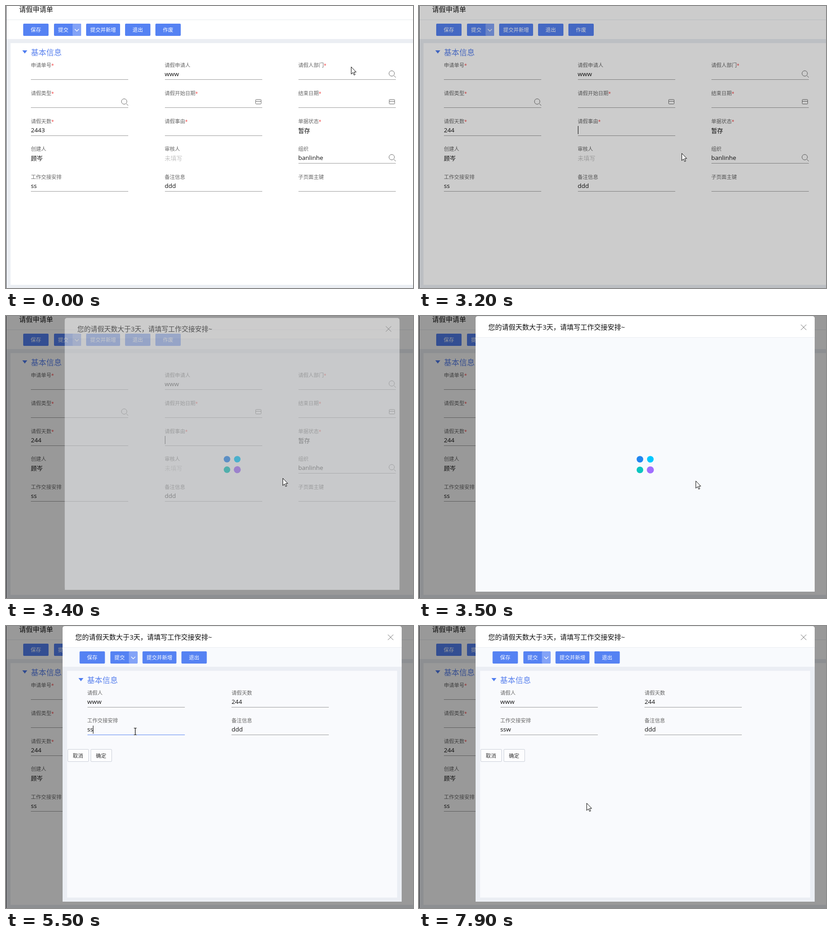
Animation of 899 by 623 pixels, one loop 8000 ms. Source, as an HTML page:

```html
<!DOCTYPE html>
<html lang="zh-CN">
<head>
<meta charset="utf-8">
<title>请假申请单</title>
<style>
  html, body { margin: 0; width: 100%; height: 100%; overflow: hidden; background: #fff; }
  svg { display: block; width: 899px; height: 623px; }
  text { font-family: "Open Sans", "Noto Sans CJK SC", "Noto Sans CJK", sans-serif; fill: #111; white-space: pre; }
  .label { font-size: 11.3px; fill: #666; }
  .star { font-size: 10px; fill: #f23c3c; }
  .latin { font-size: 13.5px; }
  .han { font-size: 13px; }
  .empty { font-size: 13px; fill: #c4c4c4; }
  .heading { font-size: 17px; fill: #5a82ee; }
  .title { font-size: 15px; }
  .button { font-size: 11.4px; fill: #fff; text-anchor: middle; }
  .plain { font-size: 11.4px; fill: #333; text-anchor: middle; }
  .icon { fill: none; stroke: #666; }
  .line { fill: #999; }
  .line.active { fill: #5582f3; }
</style>
</head>
<body>
<svg id="stage" viewBox="0 0 899 623"></svg>
<script>
const PITCH = 61.75;

const rect = (x, y, w, h, fill, extra = '') =>
  `<rect x="${x}" y="${y}" width="${w}" height="${h}" fill="${fill}" ${extra}/>`;
const text = (x, y, kind, content, extra = '') =>
  `<text x="${x}" y="${y}" class="${kind}" ${extra}>${content}</text>`;

const icons = {
  search: (x, y) => `<path class="icon" d="M${x + 4} ${y + 4}l4 4"/>
    <circle class="icon" cx="${x - 1}" cy="${y - 1}" r="6"/>`,
  calendar: (x, y) => `<rect class="icon" x="${x - 6.5}" y="${y - 5.5}" width="12" height="10" rx="1"/>
    <path class="icon" d="M${x - 6} ${y - 1.5}h11"/>`
};

// One form cell: label, value, underline and icon, placed by row.
function field(x, top, row, { label, must, value = '', kind = 'latin', line = true, icon, id = '' }) {
  const y = top + row * PITCH;
  const baseline = Math.round(y + 24 + (kind === 'latin' ? 0 : 1));
  const star = must ? '<tspan class="star">*</tspan>' : '';
  return text(x, Math.round(y + 4), 'label', label + star)
    + text(x, baseline, kind, value, id && `id="${id}Value"`)
    + (line ? rect(Math.round(x), Math.round(y + 31), 215, 1, '', `class="line" id="${id}Line"`) : '')
    + (icon ? icons[icon](Math.round(x + 207), Math.round(y + 19)) : '');
}

function buttons(dx, dy, labels) {
  const spans = [[38, 56], [106, 60], [177, 75], [263, 56], [330, 56]];
  return labels.map((label, i) => {
    const [x, w] = spans[i];
    const split = i === 1;
    return rect(x + dx, 39 + dy, w, 27, '#5582f3', 'rx="2"')
      + (split ? rect(x + dx + 41, 39 + dy, 19, 27, '#83a3f7', 'rx="2"')
        + `<path d="M${x + dx + 46} ${dy + 51}l4.5 4.5 4.5-4.5" fill="none" stroke="#fff" stroke-width="1.3"/>` : '')
      + text(x + dx + (split ? 20.5 : w / 2), 57 + dy, 'button', label);
  }).join('');
}

const heading = (dx, dy) =>
  `<path d="M${36 + dx} ${98 + dy}h11l-5.5 7z" fill="#4f7df0"/>` + text(55 + dx, 109 + dy, 'heading', '基本信息');

const mainFields = [
  [{ label: '申请单号', must: 1 }, { label: '请假申请人', value: 'www' }, { label: '请假人部门', must: 1, icon: 'search' }],
  [{ label: '请假类型', must: 1, icon: 'search' }, { label: '请假开始日期', must: 1, icon: 'calendar' },
   { label: '结束日期', must: 1, icon: 'calendar' }],
  [{ label: '请假天数', must: 1, value: '2443', id: 'days' }, { label: '请假事由', must: 1, id: 'reason' },
   { label: '单据状态', must: 1, value: '暂存', kind: 'han', line: false }],
  [{ label: '创建人', value: '顾岑', kind: 'han', line: false },
   { label: '审核人', value: '未填写', kind: 'empty', line: false },
   { label: '组织', value: 'banlinhe', icon: 'search' }],
  [{ label: '工作交接安排', value: 'ss' }, { label: '备注信息', value: 'ddd' }, { label: '子页面主键' }]
];
const dialogFields = [
  [{ label: '请假人', value: 'www' }, { label: '请假天数', value: '244' }],
  [{ label: '工作交接安排', value: 'ss', id: 'handover' }, { label: '备注信息', value: 'ddd' }]
];
const grid = (rows, columns, top) =>
  rows.map((cells, row) => cells.map((cell, i) => field(columns[i], top, row, cell)).join('')).join('');

const plainButton = (x, label) =>
  rect(x + .5, 272.5, 46, 27, '#fdfdfe', 'rx="1.5" stroke="#c9ced8"') + text(x + 23, 291, 'plain', label);
const dot = (x, y, r, fill) => `<circle cx="${x}" cy="${y}" r="${r}" fill="${fill}"/>`;

const page = rect(0, 0, 899, 623, '#fff') + rect(0, 30, 899, 1, '#e6e9ed')
  + rect(0, 73, 899, 550, '#ebeef3') + rect(10, 82, 889, 534, '#fff')
  + rect(0, 0, 1, 623, '#3a3c42')
  + text(29, 13, 'title', '请假申请单')
  + buttons(0, 0, ['保存', '提交', '提交并新增', '退出', '作废'])
  + heading(0, 0) + grid(mainFields, [55, 350.5, 645.5], 131);

const loader = dot(488, 316.5, 7.3, '#2186f0') + dot(511, 316.5, 7.3, '#00c8ff')
  + dot(488, 340, 7.3, '#0bc5c0') + dot(511, 340, 7.8, '#a06dff');

const form = rect(125, 90, 749, 519, '#ebeef4') + rect(135, 99, 729, 501, '#f9fafd')
  + buttons(124.5, 17, ['保存', '提交', '提交并新增', '退出'])
  + heading(124, 17) + grid(dialogFields, [179.5, 498.3], 147.5)
  + plainButton(136, '取消') + plainButton(187, '确定');

const dialog = rect(125, .5, 749, 608.5, '#f8fafd', 'rx="5"') + rect(125, 10, 749, 599, '#f8fafd')
  + `<path d="M125 47V5.5q0-5 5-5h739q5 0 5 5V47z" fill="#fff"/>` + rect(125, 47, 749, 1, '#e8ebf0')
  + text(153, 30, 'title', '您的请假天数大于3天，请填写工作交接安排~')
  + `<path class="icon" d="M843.5 19l12 12m0-12l-12 12"/>`
  + `<g id="loader">${loader}</g><g id="form">${form}</g>`;

document.getElementById('stage').innerHTML = page
  + rect(0, 0, 1, 18, '#000', 'id="pageCaret"')
  + rect(0, 0, 899, 623, '#000', 'id="shade"')
  + `<g id="dialog">${dialog}</g>`
  + rect(0, 220, 1, 18, '#000', 'id="dialogCaret"')
  + `<path id="arrow" d="M.5.5v16l3.7-3.5 2.6 5.6 2.4-1-2.5-5.6h4.8z" fill="#fff" stroke="#000"/>`
  + `<path id="beam" d="M-3-7.5h2.2l.8.8.8-.8H3M-3 7.5h2.2l.8-.8.8.8H3M0-7V7" fill="none" stroke="#000" stroke-width="1.2"/>`;

const $ = id => document.getElementById(id);
const show = (id, on) => { $(id).style.display = on ? '' : 'none'; };
const within = (t, spans) => spans.some(([from, to]) => t >= from && t < to);

// Pointer path: time, x, y
const path = [
  [0, 762, 134], [200, 640, 165], [400, 386, 230], [500, 340, 221], [600, 263, 223], [700, 147, 242],
  [800, 124, 270], [2100, 124, 270], [2400, 290, 200], [2700, 480, 270], [3000, 480, 270],
  [3200, 580, 325], [3300, 611, 341], [3400, 611, 358], [3500, 611, 364], [4300, 611, 364],
  [4600, 482, 195], [4800, 405, 182], [5000, 303, 219], [5100, 285.5, 233], [6600, 285.5, 233],
  [7200, 198, 282], [7500, 198, 282], [7700, 255, 318], [7900, 370, 391], [8000, 370, 391]
];

function pointer(t) {
  const i = path.findIndex(key => key[0] > t);
  const [t0, x0, y0] = path[i - 1], [t1, x1, y1] = path[i];
  const k = (t - t0) / (t1 - t0);
  return [x0 + (x1 - x0) * k, y0 + (y1 - y0) * k];
}

function caret(id, on, x, y) {
  show(id, on);
  $(id).setAttribute('x', x);
  $(id).setAttribute('y', y);
}

function render(t) {
  const [x, y] = pointer(t);
  const beam = within(t, [[800, 2300], [2700, 3100], [5100, 6700]]);
  show('beam', beam);
  show('arrow', !beam);
  $(beam ? 'beam' : 'arrow').setAttribute('transform', `translate(${x} ${y})`);

  $('daysValue').textContent = t < 1600 ? '2443' : '244';
  $('handoverValue').textContent = t < 6400 ? 'ss' : 'ssw';
  $('daysLine').classList.toggle('active', within(t, [[900, 2800]]));
  $('reasonLine').classList.toggle('active', within(t, [[2800, 3200]]));
  $('handoverLine').classList.toggle('active', within(t, [[5200, 7300]]));

  caret('pageCaret', within(t, [[900, 1400], [1900, 2400], [2800, 8000]]),
    t < 1600 ? 86 : t < 2800 ? 79 : 351, 265);
  caret('dialogCaret', within(t, [[5500, 5900], [6500, 7000]]), t < 6400 ? 192 : 202, 220);

  $('shade').setAttribute('opacity', t < 3200 ? 0 : t < 3300 ? .2 : .4);
  const opening = t < 3500;
  show('dialog', t >= 3400);
  $('dialog').setAttribute('opacity', opening ? .5 : 1);
  $('dialog').setAttribute('transform',
    opening ? 'translate(499.5 304.8) scale(.987) translate(-499.5 -304.8)' : '');
  show('loader', t < 4000);
  show('form', t >= 4000);
}

const start = performance.now();
function tick() {
  const t = (performance.now() - start) % 8000;
  render(Math.floor(t / 100) * 100);
  requestAnimationFrame(tick);
}
tick();
</script>
</body>
</html>
```
